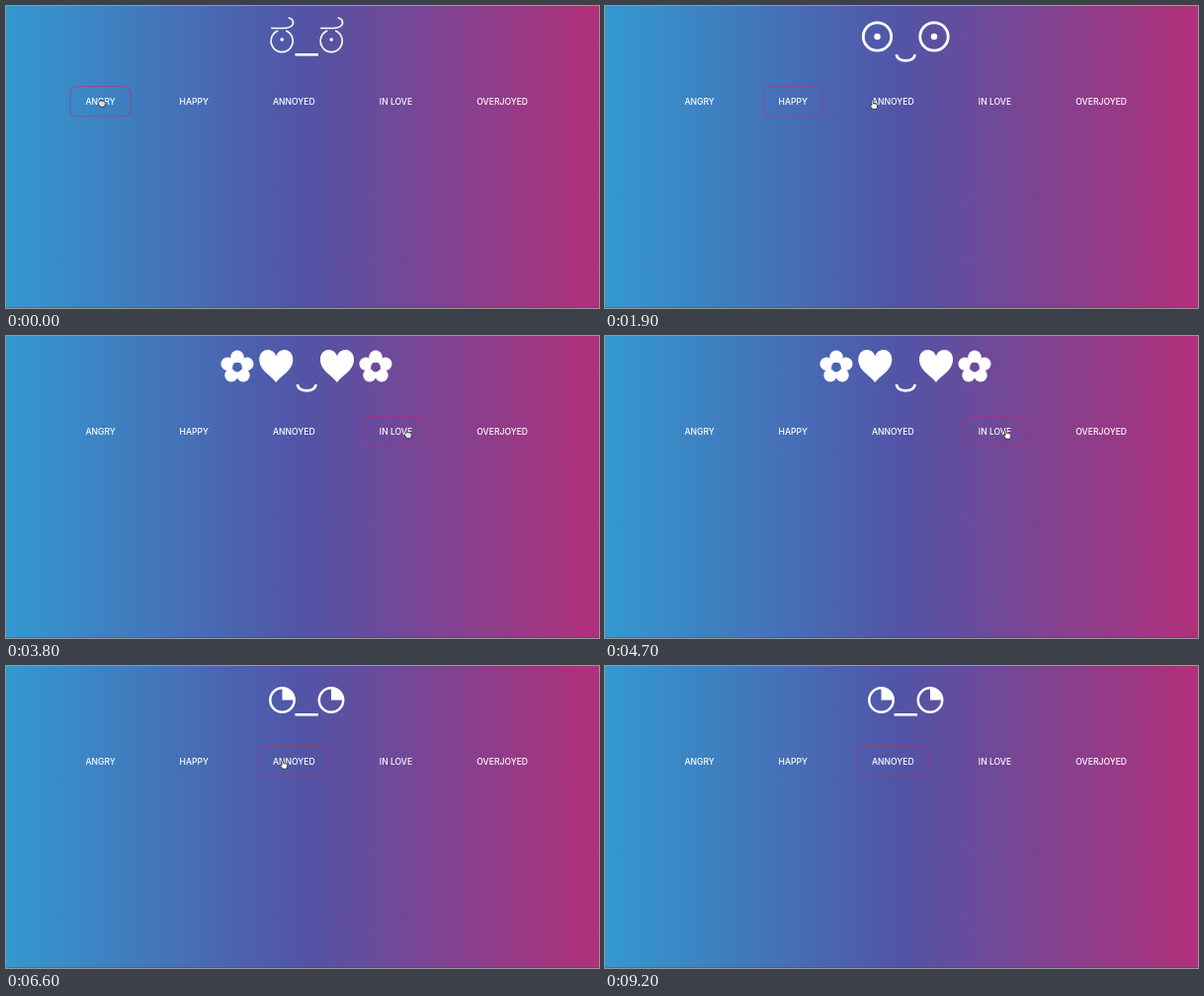
These frames come from a looping animation (600 px wide and 306 px high, 9.4 s). An HTML page:

```html
<!DOCTYPE html>
<html lang="en">
<head>
<meta charset="utf-8">
<title>Mood picker</title>
<style>
  html, body { margin: 0; width: 100%; height: 100%; overflow: hidden; }
  svg { display: block; width: 600px; height: 306px; }
  text { fill: #fff; text-anchor: middle; font: 500 8.6px Inter, sans-serif; }
  .line { fill: none; stroke: #fff; }
  .face { fill: #fff; }
  #box { fill: none; stroke: #b8307c; stroke-width: 1.1; }
  #cursor path { fill: #fff; stroke: #222; stroke-width: .9; stroke-linejoin: round; }
  #cursor #press { fill: #ddd; }
</style>
</head>
<body>
<svg viewBox="0 0 600 306">
  <defs>
    <linearGradient id="bg" gradientUnits="userSpaceOnUse" x1="0" y1="0" x2="600" y2="0">
      <stop offset="0" stop-color="#3399d0"/>
      <stop offset=".5" stop-color="#5254a6"/>
      <stop offset="1" stop-color="#b2307a"/>
    </linearGradient>
  </defs>
  <rect width="600" height="306" fill="url(#bg)"/>
  <rect y="305" width="600" height="1" fill="#303060" opacity=".3"/>
  <g id="faces"></g>
  <g id="labels"></g>
  <rect id="box" y="81.5" height="30.5" rx="6"/>
  <g id="cursor">
    <path id="point" d="M-2.6-4.3c0-1.5 1.8-1.5 1.9 0L-.4-1.4C.2-2 1-1.8 1.2-1.2 1.9-1.7 2.7-1.3 2.8-.7 3.7-1 4.3-.5 4.3.3V2.2L3.3 5H-1.2L-4.2 1.2C-4.8.2-3.6-.4-2.2 1Z"/>
    <path id="press" d="M-3.3-1.6C-3.2-3-1.7-3.2-1.2-2.4-.7-3.2.6-3.1.9-2.2 1.6-2.8 2.6-2.4 2.7-1.6 3.6-1.8 4.2-1.2 4.1-.3L3.3 4.4H-1.6L-4 1.2C-4.4.2-4.1-.8-3.3-1.6Z"/>
  </g>
</svg>
<script>
const $ = id => document.getElementById(id);
const LOOP = 9400, STEP = 100;

const moods = [
  { name: 'ANGRY', x: 95.6, w: 61 },
  { name: 'HAPPY', x: 190.3, w: 59 },
  { name: 'ANNOYED', x: 291.3, w: 72 },
  { name: 'IN LOVE', x: 394.5, w: 63 },
  { name: 'OVERJOYED', x: 502.2, w: 81 }
];

// [time of click, mood]
const clicks = [[0, 0], [1300, 1], [2500, 2], [3800, 3], [5200, 4], [6500, 2]];

// [time, x, y] of the hand
const path = [
  [0, 97, 98.5], [100, 97, 98.5], [1000, 193, 102], [1500, 193, 102], [2000, 281, 100],
  [2700, 281, 100], [3400, 407, 100], [4700, 407, 100], [5100, 503, 100],
  [5300, 503, 100], [5700, 307, 100], [6300, 281, 100], [7600, 281, 100], [8200, 310, 316]
];

const line = (d, width) => `<path class="line" d="${d}" stroke-width="${width}"/>`;
const dot = (x, y, r, fill = '#fff') => `<circle cx="${x}" cy="${y}" r="${r}" fill="${fill}"/>`;
const ring = (x, y, r, width) => `<circle class="line" cx="${x}" cy="${y}" r="${r}" stroke-width="${width}"/>`;
const pair = (draw, left, right) => draw(left) + draw(right);
const mirrored = half => half + `<g transform="translate(608) scale(-1 1)">${half}</g>`;

const mouth = '<rect x="292.5" y="48" width="23.5" height="2.6"/>';
const smile = line('M295 49C295 57.5 313.5 57.5 313.5 49', 2.6);

const frown = x => dot(x, 34, 1.8) +
  line(`M${x - 4} 25A11 11.2 0 1 0 ${x + 4} 25`, 1.6) +
  line(`M${x - 11} 22.5H${x + 2}C${x + 9} 22.5 ${x + 12.5} 19 ${x + 11} 15Q${x + 10} 12.5 ${x + 6.5} 12`, 1.6);
const stare = x => ring(x, 31, 14.2, 2.8) + dot(x, 31, 3.2);
const sideEye = x => ring(x, 34.5, 12.2, 2.5) + `<path d="M${x} 34.5V22.5A12 12 0 0 1 ${x + 12} 34.5Z"/>`;
const heart = x => `<path d="M${x} 47C${x - 5} 40 ${x - 17} 35 ${x - 17} 24C${x - 17} 12 ${x - 3} 11 ${x} 20.5` +
  `C${x + 3} 11 ${x + 17} 12 ${x + 17} 24C${x + 17} 35 ${x + 5} 40 ${x} 47Z"/>`;
const flower = x => [0, 1, 2, 3, 4].map(i => {
  const a = i * Math.PI * .4;
  return dot(x + 10.3 * Math.sin(a), 31.5 - 10.3 * Math.cos(a), 6.7);
}).join('') + dot(x, 31.5, 4.8, 'url(#bg)');
const cheer = mirrored(
  line('M200.7 10L215.7 50', 2.8) +
  line('M241.3 15Q230.7 34 241.3 53', 2.8) +
  line('M258.4 31.5L266 16.5L273.6 31.5', 2.6)
) + '<ellipse class="line" cx="304" cy="31.3" rx="13.6" ry="14.6" stroke-width="2.8"/>';

const faces = [
  pair(frown, 279.2, 329.2) + mouth,
  pair(stare, 275.5, 333) + smile,
  pair(sideEye, 279.5, 329) + mouth,
  pair(flower, 234, 374) + pair(heart, 273.3, 335) + smile,
  cheer
];

$('faces').innerHTML = faces.map(f => `<g class="face">${f}</g>`).join('');
$('labels').innerHTML = moods.map(m => `<text x="${m.x}" y="100.2">${m.name}</text>`).join('');

function handAt(t) {
  const i = path.findIndex(p => p[0] > t);
  if (i < 0) return path.at(-1).slice(1);
  const a = path[i - 1], b = path[i];
  const u = (t - a[0]) / (b[0] - a[0]), e = u * u * (3 - 2 * u);
  return [1, 2].map(k => a[k] + (b[k] - a[k]) * e);
}

function draw(now) {
  const t = Math.floor(now % LOOP / STEP) * STEP;
  const [clicked, mood] = clicks.findLast(c => c[0] <= t);
  const pressed = t - clicked < STEP;
  [...$('faces').children].forEach((f, i) => f.style.display = i === mood ? '' : 'none');

  const { x, w } = moods[mood], box = $('box');
  box.setAttribute('x', x - w / 2);
  box.setAttribute('width', w);
  box.setAttribute('stroke-dasharray', pressed ? 'none' : '1.4 1');
  box.setAttribute('opacity', pressed ? .6 : .9);

  $('cursor').setAttribute('transform', `translate(${handAt(t)}) scale(.85)`);
  $('point').style.display = pressed ? 'none' : '';
  $('press').style.display = pressed ? '' : 'none';
}

const start = performance.now();
function tick() {
  draw(performance.now() - start);
  requestAnimationFrame(tick);
}
tick();
</script>
</body>
</html>
```
